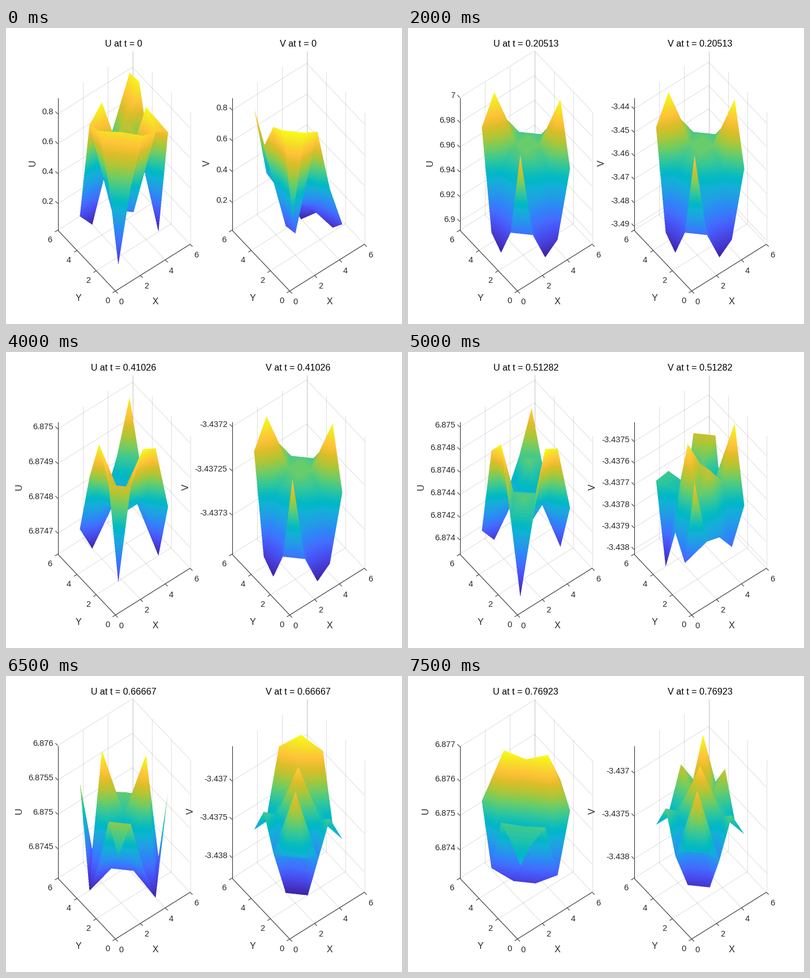
Animation of 700 by 525 pixels, one loop 8 s. Source, as a matplotlib script:

```python
from itertools import product

import matplotlib.pyplot as plt
import numpy as np
from matplotlib.animation import FuncAnimation
from matplotlib.collections import LineCollection
from matplotlib.colors import LinearSegmentedColormap

W, H, SS = 700, 525, 2
STEPS, INTERVAL, NODES = 16, 500, 5
DARK = (0.15, 0.15, 0.15)
GRID = DARK + (0.15,)
TICK_PT, LABEL_PT = 14.67 * 0.72, 16.13 * 0.72

# Axonometric screen vectors for one data unit; z is vertical
ORIGIN = np.array([193.5, 466.5])
EX = np.array([22.0, -13.83])
EY = np.array([-17.0, -18.0])
TALL = 235.0
SHIFT = {"U": 0, "V": 308}

HUES = [(.242, .150, .660), (.276, .233, .828), (.281, .323, .958),
        (.262, .432, .994), (.179, .529, .968), (.130, .620, .898),
        (.069, .695, .839), (.040, .738, .742), (.216, .784, .592),
        (.430, .802, .400), (.672, .779, .223), (.863, .741, .160),
        (.997, .766, .220), (.966, .875, .160), (.977, .984, .081)]
knots = list(zip(np.linspace(0, 1, len(HUES)), HUES))
knots.insert(7, (.465, (.004, .716, .786)))
SHADES = LinearSegmentedColormap.from_list("shades", knots, N=64)

# Key heights by node (xy digits); mirrored in x = y unless both are given
TABLE = {11: .08, 12: .6, 13: .92, 14: .89, 15: .14, 51: .83, 22: .93, 23: .28,
         24: 1, 25: .02, 45: .72, 54: .98, 55: .97}
SHEET = {11: .4, 12: .98, 13: .93, 14: .71, 41: .45, 15: .92, 51: .13, 22: .16,
         23: .14, 32: .53, 25: .38, 52: .03, 44: 0, 55: .13}
LEGS = {11: .87, 12: .26, 13: .05, 14: .12, 15: .78, 51: .56, 25: .97, 22: .4,
        33: .63, 44: .63, 55: .4}
CROWN = {n: 1 - h for n, h in LEGS.items()} | {14: .65, 41: .9, 45: .57, 55: .92}
STAR = CROWN | {11: 0, 12: .4, 14: .93, 25: .14, 33: .2, 44: .73, 55: .81}
RIDGE = {11: .74, 12: .28, 21: .45, 13: .25, 31: .4, 14: 0, 41: .39, 15: .22, 51: .73,
         25: .41, 52: 1, 23: .65, 33: .76, 35: .4, 44: .79, 55: .7}
WINGS = {11: .69, 12: .35, 21: .52, 13: .6, 14: .25, 41: .44, 15: .46, 25: .38, 52: .77,
         23: 1, 32: .83, 35: 0, 45: .73, 55: .72}
HORNS = {11: .53, 12: .7, 14: .08, 15: .76, 22: .4, 23: .25, 24: 1, 25: .24,
         33: .57, 44: .6, 55: .44}
DRUM = {11: .42, 13: .59, 14: .17, 15: .6, 22: .58, 23: .09, 24: 1, 33: .95, 55: 0}
DOME = {11: .53, 12: .45, 13: .4, 14: .62, 15: .42, 22: .85, 23: .06, 24: .54, 25: .45,
        33: .9, 34: .64, 35: .9, 44: 1, 55: .4}
TENT = DOME | {13: .34, 35: .76, 55: 0}

# Key steps: shape and z limits of each panel
KEYS = {
    0: {"U": (TABLE, .0226, .9095), "V": (SHEET, .0207, .8806)},
    4: {"U": (LEGS, 6.89305, 6.99995), "V": (LEGS, -3.4917, -3.4352)},
    6: {"U": (RIDGE, 6.8713605, 6.8715667), "V": (CROWN, -3.440459, -3.437694)},
    8: {"U": (CROWN, 6.87464, 6.875021), "V": (LEGS, -3.437344, -3.4371943)},
    11: {"U": (STAR, 6.873246, 6.875307), "V": (WINGS, -3.438559, -3.437315)},
    13: {"U": (HORNS, 6.874074, 6.876), "V": (DOME, -3.438265, -3.436537)},
    15: {"U": (DRUM, 6.87318, 6.877033), "V": (TENT, -3.438224, -3.436678)},
}


def relax(keys):
    """Fill free nodes with the mean of their neighbours."""
    known = np.full((NODES, NODES), np.nan)
    for n, h in keys.items():
        known[n // 10 - 1, n % 10 - 1] = h
    for n, h in keys.items():
        known[n % 10 - 1, n // 10 - 1] = h

    def around(a):
        p = np.pad(a, 1)
        return p[:-2, 1:-1] + p[2:, 1:-1] + p[1:-1, :-2] + p[1:-1, 2:]

    z, count = np.full_like(known, 0.5), around(np.ones_like(known))
    for _ in range(100):
        z = np.where(np.isnan(known), around(z) / count, known)
    return z


def state(name, step):
    """Heights scaled to 0..1 and z limits at a step."""
    a = max(k for k in KEYS if k <= step)
    b = min(k for k in KEYS if k >= step)
    f = (step - a) / (b - a) if b > a else 0
    (sa, la, ha), (sb, lb, hb) = KEYS[a][name], KEYS[b][name]
    z = relax(sa) * (1 - f) + relax(sb) * f
    mid = ((la + ha) * (1 - f) + (lb + hb) * f) / 2
    half = (ha - la) ** (1 - f) * (hb - lb) ** f / 2
    return (z - z.min()) / (z.max() - z.min()), mid - half, mid + half


def ticks(lo, hi):
    span = hi - lo
    power = 10.0 ** np.floor(np.log10(span / 6.5))
    step = next(m * power for m in (1, 2, 5, 10) if span / (m * power) <= 6.5)
    eps = span * 1e-3
    first, last = np.ceil((lo - eps) / step), np.floor((hi + eps) / step)
    return np.arange(first, last + 1) * step


def place(name, x, y, z=0.0):
    p = ORIGIN + x * EX + y * EY
    return np.array([p[0] + SHIFT[name], p[1] - z * TALL])


def fill(value, near, pts, vals, depths):
    """Rasterise one triangle, keeping the nearest sample."""
    p = pts * SS - 0.5
    x0, y0 = np.floor(p.min(0)).astype(int)
    x1, y1 = np.ceil(p.max(0)).astype(int) + 1
    gy, gx = np.mgrid[y0:y1, x0:x1]
    (ax_, ay), (bx, by), (cx, cy) = p
    det = (by - cy) * (ax_ - cx) + (cx - bx) * (ay - cy)
    if abs(det) < 1e-6:
        return
    u = ((by - cy) * (gx - cx) + (cx - bx) * (gy - cy)) / det
    v = ((cy - ay) * (gx - cx) + (ax_ - cx) * (gy - cy)) / det
    w = 1 - u - v
    d = u * depths[0] + v * depths[1] + w * depths[2]
    box = np.s_[y0:y1, x0:x1]
    hit = (np.minimum(np.minimum(u, v), w) >= -1e-6) & (d < near[box])
    near[box][hit] = d[hit]
    value[box][hit] = (u * vals[0] + v * vals[1] + w * vals[2])[hit]


def split(z, i, j):
    """Two triangles of a cell, folded into a valley where that is flatter."""
    a, b, c, d = (i, j), (i + 1, j), (i + 1, j + 1), (i, j + 1)
    za, zb, zc, zd = (z[y, x] for x, y in (a, b, c, d))
    if max(za, zc) < min(zb, zd) and abs(za - zc) < abs(zb - zd):
        return (a, b, c), (a, c, d)
    return (a, b, d), (c, b, d)


def surfaces(heights):
    value = np.zeros((H * SS, W * SS))
    near = np.full(value.shape, np.inf)
    for name, z in heights.items():
        for i, j in product(range(NODES - 1), repeat=2):
            for tri in split(z, i, j):
                vals = [z[y, x] for x, y in tri]
                pts = np.array([place(name, x + 1, y + 1, z[y, x]) for x, y in tri])
                fill(value, near, pts, vals, [x + y for x, y in tri])
    seen = np.isfinite(near).astype(float)
    rgb = SHADES(np.clip(value, 0, 1))[..., :3] * seen[..., None]
    cover = seen.reshape(H, SS, W, SS).sum((1, 3))
    rgb = rgb.reshape(H, SS, W, SS, 3).sum((1, 3)) / np.maximum(cover, 1)[..., None]
    return np.dstack([rgb, cover / SS ** 2])


plt.rcParams["font.family"] = "Liberation Sans"
fig = plt.figure(figsize=(W / 100, H / 100), dpi=100, facecolor="white")
ax = fig.add_axes([0, 0, 1, 1])
ax.axis("off")
image = ax.imshow(np.zeros((H, W, 4)), extent=(0, W, H, 0), aspect="auto",
                  interpolation="nearest", zorder=2)
ax.set_xlim(0, W)
ax.set_ylim(H, 0)


def lines(segs, color, z):
    return ax.add_collection(
        LineCollection(segs, colors=[color], linewidths=0.72, zorder=z), autolim=False)


def write(x, y, s, size=TICK_PT, color=DARK, **kw):
    """Text with its capitals centred on y."""
    kw.setdefault("ha", "center")
    return ax.text(x, y + size / 0.72 * 0.36, s, fontsize=size, color=color,
                   va="baseline", zorder=5, **kw)


def unit(v, length):
    return v / np.hypot(*v) * length


def frame(name):
    """Everything in one panel that never changes."""
    def at(*p):
        return place(name, *p)

    grid, axes = [], [(at(0, 0), at(6, 0)), (at(0, 0), at(0, 6)), (at(0, 6), at(0, 6, 1))]
    for k in (0, 2, 4, 6):
        grid += [(at(k, 0), at(k, 6)), (at(0, k), at(6, k)),
                 (at(k, 6), at(k, 6, 1)), (at(6, k), at(6, k, 1))]
        axes += [(at(k, 0), at(k, 0) + unit(-EY, 6)), (at(0, k), at(0, k) + unit(-EX, 6))]
        write(*(at(k, 0) + (10.5, 18.2)), str(k))
        write(*(at(0, k) + (-14.5, 16.7)), str(k))
    lines(grid, GRID, 1)
    lines(axes, DARK, 3)
    write(264 + SHIFT[name], 483.7, "X", LABEL_PT)
    write(128 + SHIFT[name], 477.7, "Y", LABEL_PT)


for panel in SHIFT:
    frame(panel)
moving = []


def scale(name, step, lo, hi):
    """Title, z ticks, z grid and z label of one panel."""
    grid, marks, left = [], [], W
    to_px = ax.transData.inverted()
    for t in ticks(lo, hi):
        z = (t - lo) / (hi - lo)
        p, back, right = (place(name, a, b, z) for a, b in ((0, 6), (6, 6), (6, 0)))
        grid += [(p, back), (back, right)]
        marks.append((p, p + unit(EY, 6)))
        label = write(p[0] - 8, p[1] - 4.5, f"{round(t, 9) + 0.0:.8g}", ha="right")
        box = label.get_window_extent()
        left = min(left, to_px.transform((box.x0, box.y0))[0])
        moving.append(label)
    moving.append(lines(grid, GRID, 1))
    moving.append(lines(marks, DARK, 3))
    moving.append(ax.text(left - 11, 239.3, name, fontsize=LABEL_PT, color=DARK, rotation=90,
                          rotation_mode="anchor", ha="center", va="baseline", zorder=5))
    moving.append(write(208.2 + SHIFT[name], 27, f"{name} at t = {2 * step / 39:.5g}",
                        LABEL_PT, "black"))


def draw(step):
    while moving:
        moving.pop().remove()
    heights = {}
    for name in SHIFT:
        heights[name], lo, hi = state(name, step)
        scale(name, step, lo, hi)
    image.set_data(surfaces(heights))
    return [image]


anim = FuncAnimation(fig, draw, frames=STEPS, interval=INTERVAL,
                     repeat=True, repeat_delay=0, blit=False)
plt.show()
```
